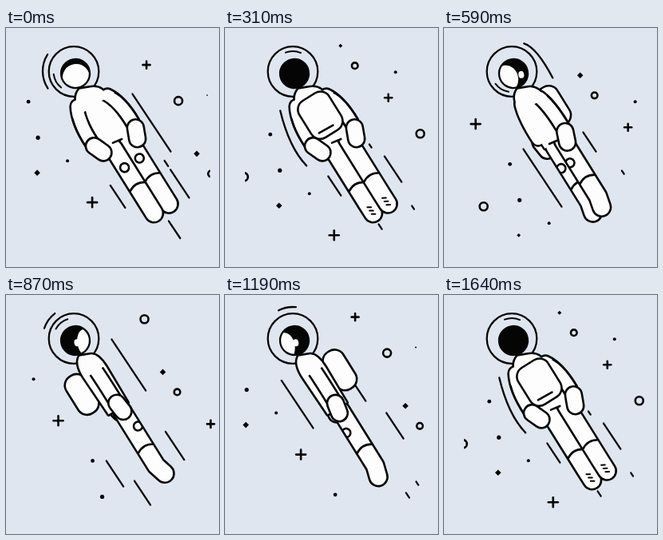
These frames come from a looping animation (267x299 px, 1670 ms). An HTML page with a canvas:

```html
<!DOCTYPE html>
<html lang="en">
<head>
<meta charset="utf-8">
<title>Spinning astronaut</title>
<style>
  html, body { margin: 0; width: 100%; height: 100%; overflow: hidden; background: #dfe6f0; }
  canvas { display: block; width: 100vw; height: 100vh; }
</style>
</head>
<body>
<canvas id="stage"></canvas>
<script>
const W = 267, H = 299, LOOP = 1670;
const CYCLE = 1330, TURN = CYCLE / 2;   // one drift of the stars, one spin of the body
const PAPER = '#dfe6f0', INK = '#050505', SUIT = '#fdfdfe';
const THICK = 2.6, THIN = 2.3;
const RAD = Math.PI / 180;
const canvas = document.getElementById('stage');
const g = canvas.getContext('2d');

const mod = (v, n) => ((v % n) + n) % n;
const offset = (t, peak) => mod(t - peak + CYCLE / 2, CYCLE) - CYCLE / 2;

// kind, x and y at time zero, size, first and last moment
const particles = [
  ['plus', 176, 46, 4.5, -235, 920],
  ['plus', 108, 218, 6, -960, 365],
  ['ring', 216, 91, 5, -580, 440],
  ['ring', 134, 6, 3.8, 90, 1360],
  ['ring', -5, 145, 5, 295, 740],
  ['dot', 185, 14, 2, 130, 760],
  ['diamond', 116, -19, 3.8, 295, 1490],
  ['dot', 28, 92, 2.4, -60, 1345],
  ['dot', 40, 137, 2.6, -200, 960],
  ['diamond', 39, 181, 3.8, -200, 605],
  ['dot', 77, 166, 2, -560, 750],
  ['dot', 252, 84, 1, -200, 25]
];

// lane (x where y is 0), middle y, half length, moment of full length
const streaks = [
  [103.5, 118, 36, 0], [88, 165, 22, -55], [-0.5, 160, 34, -95], [43, 252, 11, 0],
  [88, 206, 5, 70], [64, 243, 8, 70], [42, 260, 3, 70], [7, 176, 2, 70],
  [5.7, 197, 12, 310], [93, 176, 16, 310], [84, 147, 2, 310], [86, 224, 2, 310], [29, 248, 3, 310],
  [-1.5, 187, 36, 590], [87.5, 142, 12, 590], [104, 180, 2, 590],
  [95.5, 87, 32, 870], [-12.5, 223, 16, 870], [6, 247, 15, 870], [86, 188, 17.5, 870],
  [104, 163, 16, 1190], [62, 250, 3, 1190], [84, 235, 2, 1190]
];

// streaks that bend around the body: moment, start, control, end
const bends = [
  [70, 52, 77, 73, 105, 80, 137],
  [310, 69, 103, 80, 149, 102, 172],
  [590, 100, 19, 116, 24, 136, 62]
];

// moment within a spin and the direction faced, in radians
const poses = [[-140, -1.5], [-75, -0.95], [0, 0], [70, 0.35], [205, 1.65], [310, 3.1], [525, 4.783]];

function facing(t) {
  const u = mod(t + 140, TURN) - 140;
  const i = poses.findIndex(p => u < p[0]);
  const [t0, a0] = poses[i - 1], [t1, a1] = poses[i];
  return a0 + (a1 - a0) * (u - t0) / (t1 - t0);
}

function pen(draw, width = THICK, color = INK) {
  g.beginPath();
  draw();
  g.lineWidth = width;
  g.strokeStyle = color;
  g.stroke();
}

function line(x1, y1, x2, y2, width) {
  pen(() => { g.moveTo(x1, y1); g.lineTo(x2, y2); }, width);
}

function shape(draw, color = SUIT) {
  g.beginPath();
  draw();
  g.fillStyle = color;
  g.fill();
}

function clipped(x, y, w, h, draw) {
  g.save();
  g.beginPath();
  g.rect(x, y, w, h);
  g.clip();
  draw();
  g.restore();
}

// A rounded limb: thick dark stroke with a thinner light one inside
function limb(draw, width) {
  pen(draw, width + THICK);
  pen(draw, width - THICK, SUIT);
}

function drawParticle([kind, x0, y0, size, from, to], t) {
  const k = from + mod(t - from, CYCLE);
  if (k > to) return;
  const x = x0 + 0.0925 * k, y = y0 + 0.1325 * k;
  const s = size * Math.min(1, 0.35 + (k - from) / 50, 0.35 + (to - k) / 50);
  if (kind === 'plus') {
    line(x - s, y, x + s, y, THICK);
    line(x, y - s, x, y + s, THICK);
  } else if (kind === 'dot') {
    shape(() => g.arc(x, y, s, 0, 7), INK);
  } else if (kind === 'diamond') {
    shape(() => {
      g.moveTo(x - s, y); g.lineTo(x, y - s); g.lineTo(x + s, y); g.lineTo(x, y + s);
    }, INK);
  } else {
    clipped(25, 0, 231, H, () => pen(() => g.arc(x, y, size, 0, 7)));
  }
}

function drawStreaks(t) {
  for (const [lane, mid, half, peak] of streaks) {
    const d = offset(t, peak), h = half * (1 - (d / 125) ** 2);
    const y1 = mid + 0.53 * d - h, y2 = Math.min(263, mid + 0.53 * d + h);
    if (h > 0 && y2 > y1) line(lane + y1 / 1.5, y1, lane + y2 / 1.5, y2, THIN);
  }
  for (const [peak, x1, y1, cx, cy, x2, y2] of bends) {
    const d = offset(t, peak);
    if (Math.abs(d) > 65) continue;
    const dx = d * 0.25, dy = d * 0.37;
    pen(() => { g.moveTo(x1 + dx, y1 + dy); g.quadraticCurveTo(cx + dx, cy + dy, x2 + dx, y2 + dy); }, THIN);
  }
  arcAround(180, 33, offset(t, 0), -190, 35);
  arcAround(216, 17, offset(t, 870), -80, 70);
}

function arcAround(angle, half, d, from, to) {
  if (d < from || d > to) return;
  const mid = angle - 0.57 * d, h = d < -70 ? half / 2 : half;
  pen(() => g.arc(85, 54, 39, (mid - h) * RAD, (mid + h) * RAD), THIN);
}

function drawHelmet(t) {
  pen(() => g.arc(85, 54.5, 31.3, 0, 7), THIN);
  const u = mod(t + 110, TURN) - 110;
  if (u < 400) {
    const mid = 150 + 0.39 * u;
    pen(() => g.arc(85, 54.5, 25.5, (mid - 22) * RAD, (mid + 22) * RAD), 2);
  }
}

function drawHead(a) {
  const sin = Math.sin(a), rx = 21 * Math.abs(Math.cos(a / 2)) - 4;
  g.save();
  g.translate(87, 57);
  g.rotate(-10 * RAD);
  g.beginPath();
  g.arc(0, 0, 18, 0, 7);
  g.fillStyle = INK;
  g.fill();
  g.save();
  g.clip();
  if (rx > 0) shape(() => g.ellipse(12 * sin, 5, rx, 17, 0, 0, 7));
  for (const side of [-1, 1]) {
    const ear = a + side * Math.PI / 2;
    if (Math.cos(ear) > 0.6) shape(() => g.ellipse(16 * Math.sin(ear), 3, 3.5, 4.5, 0, 0, 7));
  }
  g.restore();
  pen(() => g.arc(0, 0, 18, 0, 7), THIN);
  g.restore();
}

function drawPack(sin, cos) {
  const half = 14 + 8 * cos * cos, x = -29 * sin * Math.abs(sin);
  const box = () => g.roundRect(x - half, 38, half * 2, 54, 13);
  shape(box);
  pen(box);
  if (cos < -0.6) line(x - 13, 83, x + 7, 84);
}

function drawLeg(side, sin, cos) {
  const x = 2 + side * 11 * cos;
  limb(() => { g.moveTo(x, 108); g.lineTo(x, 190); g.lineTo(x + 4 * sin, 204); }, 23);
  pen(() => { g.moveTo(x - 11, 165); g.quadraticCurveTo(x, 158, x + 11, 165); });
  if (cos > -0.2) {
    clipped(x - 11, 120, 22, 35, () => pen(() => g.arc(x - 1 + 8 * sin, 136, 5.5, 0, 7)));
  }
  if (cos < -0.6) for (const y of [194, 199, 204]) line(x - 2, y, x + 2, y + 2.4, 2);
}

function drawBody(a) {
  const sin = Math.sin(a), cos = Math.cos(a);
  const w = 15 + 5 * Math.abs(cos);
  const [far, near] = sin > 0 ? [1, -1] : [-1, 1];
  const sides = [far, near];
  const sideways = Math.abs(sin) > 0.5;
  const packInFront = cos < -0.3;
  const torso = () => {
    g.moveTo(-6, 23);
    g.quadraticCurveTo(-w, 28, -w, 48);
    g.lineTo(2 - w, 104);
    g.lineTo(w - 1, 104);
    g.lineTo(w, 52);
    g.quadraticCurveTo(w, 34, 8, 29);
    g.closePath();
  };
  const armX = side => side * 27 * cos;
  const arm = (side, shift = 0) => () => {
    const x = armX(side);
    g.moveTo(x * 0.72 + shift, 44 + x * 0.16);
    g.quadraticCurveTo(x * 1.08 + shift, 60 + x * 0.12, x * 1.05 + shift, 91 + x * 0.12);
  };
  const glove = side => {
    const x = armX(side), drop = x * 0.15;
    limb(() => { g.moveTo(x * 1.04, 97 + drop); g.lineTo(x * 0.84 + 2 * sin, 110 + drop); }, 21);
  };
  const sleeve = side => clipped(-60, 50, 120, 45, () => {
    pen(arm(side, -9));
    pen(arm(side, 9));
  });

  g.save();
  g.translate(85, 54);
  g.rotate(-32 * RAD);
  if (!packInFront) drawPack(sin, cos);
  if (sideways) glove(far);
  pen(torso, 2 * THICK);
  sides.forEach(s => pen(arm(s), 20.6));
  if (Math.abs(cos) > 0.2) drawLeg(far, sin, cos);
  drawLeg(near, sin, cos);
  shape(torso);
  sides.forEach(s => pen(arm(s), 15.4, SUIT));
  if (Math.abs(cos) > 0.4) line(-6 + 3 * sin, 102, 6 + 3 * sin, 104);
  if (!sideways) sleeve(far);
  sleeve(near);
  if (packInFront) drawPack(sin, cos);
  if (!sideways) glove(far);
  glove(near);
  g.restore();
}

function frame(now) {
  const t = now % LOOP;
  const ratio = window.devicePixelRatio || 1;
  const pw = Math.round(innerWidth * ratio), ph = Math.round(innerHeight * ratio);
  if (canvas.width !== pw || canvas.height !== ph) {
    canvas.width = pw;
    canvas.height = ph;
  }
  g.setTransform(pw / W, 0, 0, ph / H, 0, 0);
  g.fillStyle = PAPER;
  g.fillRect(0, 0, W, H);
  g.lineCap = g.lineJoin = 'round';
  const a = facing(t);
  particles.forEach(p => drawParticle(p, t));
  drawStreaks(t);
  drawHelmet(t);
  drawBody(a);
  drawHead(a);
  requestAnimationFrame(frame);
}
requestAnimationFrame(frame);
</script>
</body>
</html>
```
